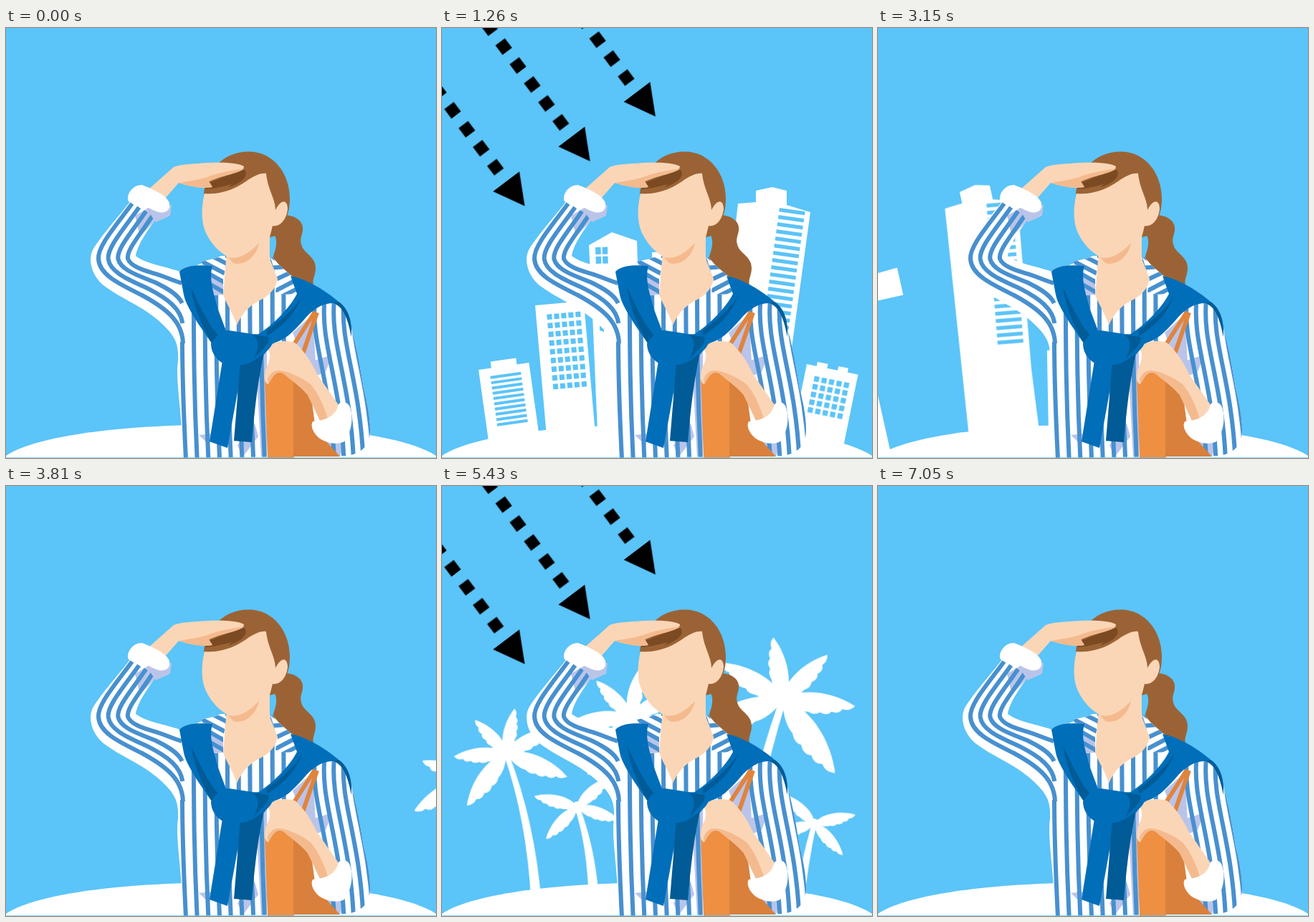
Recreate the animation shown at these times as an HTML page. Size 600x600 px, loop 7200 ms.

```html
<!DOCTYPE html>
<html lang="en">
<head>
<meta charset="utf-8">
<title>Looking into the distance</title>
<style>
html, body { margin: 0; width: 100%; height: 100%; overflow: hidden; background: #5bc4f8; }
svg { display: block; width: 100vw; height: 100vh; }
.turn { transform-origin: 285px 1700px; }
.white { fill: #fff; }
.sky { fill: #5bc4f8; }
.skin { fill: #fbd6b6; }
.skin2 { fill: #f4ba8e; }
.hair { fill: #9b6335; }
.hair2 { fill: #7b4a22; }
.knit { fill: #006eb9; }
.knit2 { fill: #005b96; }
.shade { fill: #bac4e9; }
.stripes { fill: none; stroke: #4790cf; stroke-width: 6; }
</style>
</head>
<body>
<svg viewBox="0 0 600 600">
  <defs>
    <clipPath id="shirt"><path d="M174 241C160 260 128 295 120 312C114 328 122 350 140 362C165 380 200 392 225 420C238 434 241 445 240 465C236 490 246 540 247 600L470 597C490 597 502 587 506 575C511 560 506 530 499 503C494 470 486 425 473 392L440 375L398 350L372 320L300 318L243 340C220 332 195 329 181 318C184 300 200 280 209 266L216 250L180 234Z"/></clipPath>
    <clipPath id="collarL"><path d="M272 326L303 319L309 322L303 350V372L288 373L285 345Z"/></clipPath>
    <clipPath id="collarR"><path d="M369 320L400 347L406 371L383 372L376 368L379 352Z"/></clipPath>
  </defs>
  <rect class="sky" width="600" height="600"/>
  <path class="white" d="M-4 600C70 538 530 538 604 600Z"/>
  <g id="city" class="turn white"></g>
  <g id="palms" class="turn white"></g>
  <g id="arrows"></g>

  <g id="woman">
    <path class="hair" d="M384 262C396 259 413 266 414 278C415 288 409 292 412 302C415 315 432 318 432 335C432 346 427 349 429 359L400 350C392 336 373 329 372 324C373 314 381 303 375 289Z"/>
    <g clip-path="url(#shirt)">
      <rect class="white" x="100" y="220" width="420" height="380"/>
      <path class="shade" d="M180 262L187 291L207 270L232 262L232 246L200 250ZM348 450H364V600H356ZM269 568L287 566L284 582ZM347 552L323 582L330 599L352 570ZM427 465L455 456L446 480L434 485ZM400 425L428 400L434 500L420 480ZM282 345L300 345L296 374L288 374ZM440 574L472 576L466 600Z"/>
      <g id="shirtStripes" class="stripes"></g>
    </g>
    <g clip-path="url(#collarL)">
      <path class="white" d="M265 315H315V380H265Z"/>
      <path class="shade" d="M284 345L304 350V380H284Z"/>
      <path class="stripes" d="M272 325L310 345M287 318L312 331M280 341L308 357M282 356L308 371"/>
    </g>
    <g clip-path="url(#collarR)">
      <path class="white" d="M350 315H410V385H350Z"/>
      <path class="stripes" d="M366 335L392 333M374 352L402 339M366 372L406 351M376 379L410 362"/>
    </g>

    <path class="skin" d="M309 300L303 372C310 390 318 400 322 415C331 395 342 386 358 378C368 372 377 363 379 350L368 322V280Z"/>
    <path class="hair" d="M276 231C279 205 298 172.500 339 172.500C373 172.500 396 203 396 238C396 262 388 270 383 277L376 290L368 292L360 230Z"/>
    <path class="skin" d="M277 231C273 247 272 266 277 281C284 300 303 321 319 321C332 321 345 309 354 300L368 292L372 276C382 278 391 268 393 253C393 239 384 238 376 254C376 238 365 225 363 203C355 202 345 207 335 214C315 228 296 232 277 231Z"/>
    <path class="skin2" d="M310 320C327 324 341 312 353 300C350 318 333 333 317 328Z"/>
    <path class="hair2" d="M283 216L332 197C341 207 327 217 309 223C297 226 288 229 277 227Z"/>
    <path class="hair" d="M276 231L278 225C290 224 304 221 315 218L306 227C296 231 286 232 276 231Z"/>

    <path class="skin" d="M199 225L234 194C244 190 255 190 268 189C294 187 322 187 332 193C333 198 318 203 301 207L283 214L288 222C270 224 253 220 241 216L221 239Z"/>
    <path class="skin2" d="M242 216C262 212 275 211 286 206C303 200 322 198 333 196C325 203 300 206 283 214L288 222C273 225 256 221 242 216Z"/>
    <path class="shade" d="M196 252L209 271L229 262L231 247Z"/>
    <path class="white" d="M170 238C170 230 177 219 190 219C205 225 224 233 228 244C230 254 223 259 213 257C200 253 188 243 178 243C172 244 170 242 170 238Z"/>

    <path fill="#ee8f42" d="M361 488L365 600H402V470H375Z"/>
    <path fill="#d9803c" d="M401 470L424 500L432 560L466 598H401Z"/>
    <path d="M397 449L431 396M414 455L434 397" fill="none" stroke="#e0843d" stroke-width="6"/>

    <path class="knit" d="M242 340C250 331 268 330 288 332C282 352 292 376 296 393L308 425L288 441C273 420 251 389 248 372ZM348 430C368 418 394 394 406 371L397 346C420 350 448 368 464 382C476 390 483 405 482 428C479 408 469 386 457 384C442 384 429 391 415 408C401 424 388 437 371 440L360 456Z"/>
    <path class="knit2" d="M258 362C270 387 281 413 297 430L288 441C276 421 263 393 258 362ZM464 382C476 390 483 407 482 431C477 406 471 389 457 384ZM364 422C390 402 399 395 414 373L408 385C398 404 387 414 364 430Z"/>
    <path class="knit" d="M303 458L284 577L309 586L330 470Z"/>
    <path class="knit2" d="M327 466L318 576L343 578C346 544 350 497 361 449Z"/>

    <path class="skin" d="M370 443C376 436 393 436 403 439C416 450 426 466 434 483L469 533L442 556L421 512C411 500 400 493 387 482C376 477 372 487 366 497C359 495 360 482 364 472C369 464 369 455 366 449Z"/>
    <path class="skin2" d="M383 478C400 481 414 489 425 497C437 511 444 529 449 545L441 554L421 512C410 499 400 493 387 482C376 477 372 487 366 497L365 490C369 480 376 477 383 478Z"/>
    <path class="knit" d="M286 440C293 430 300 421 311 422L344 427C358 428 370 426 372 435C373 447 358 456 346 464C333 473 318 470 301 467C291 460 286 451 286 440Z"/>
    <path class="knit2" d="M345 428L366 431C369 442 354 451 344 463C353 449 355 438 345 428Z"/>
    <path class="white" d="M428 549C440 548 458 545 463 528C466 519 475 521 479 527C486 543 482 564 472 577C461 583 446 578 438 573C429 566 424 555 428 549Z"/>
  </g>
  <rect class="sky" y="599" width="600" height="1" opacity=".7"/>
</svg>

<script>
const LOOP = 7200, HALF = LOOP / 2;
const $ = id => document.getElementById(id);
const times = (n, make) => Array.from({ length: n }, (_, i) => make(i)).join('');

// Shirt: arm stripes blend between an outer and an inner curve
const outer = [176, 245, 150, 280, 128, 305, 129, 322, 130, 345, 160, 358, 190, 373, 225, 392, 246, 410, 247, 440];
const inner = [205, 261, 186, 290, 168, 310, 170, 322, 175, 335, 200, 340, 215, 345, 228, 350, 238, 354, 245, 356];

function armStripe(i) {
  const [x, y, ...rest] = outer.map((v, k) => v + (inner[k] - v) * i / 3);
  return `<path d="M${x} ${y}C${rest.join(' ')}"/>`;
}

const bodyStripe = i => {
  const x = 247 + 15.7 * i;
  return `<path d="M${x - 1} ${i ? 310 : 438}C${x - 1} 460 ${x} 520 ${x + 4} 602"/>`;
};
const sleeveStripe = i => {
  const x = 431 + 13.5 * i;
  return `<path d="M${x} 380C${x - 6} 440 ${x + 22} 490 ${x + 27} 602"/>`;
};
$('shirtStripes').innerHTML = times(4, armStripe) + times(10, bodyStripe) + times(5, sleeveStripe);

// City: each block is drawn in its own tilted frame
const rect = (x, y, w, h, cls = 'white') =>
  `<rect class="${cls}" x="${x}" y="${y}" width="${w}" height="${h}"/>`;
const windows = (x, y, cols, rows, dx, dy, w, h) =>
  times(rows, r => times(cols, c => rect(x + c * dx, y + r * dy, w, h, 'sky')));
const block = (x, y, tilt, body) =>
  `<g transform="translate(${x} ${y}) rotate(${tilt})">${body}</g>`;

$('city').innerHTML =
  block(51, 477, -8, rect(0, 0, 71, 150) + rect(18, -9, 36, 12) + windows(15, 11, 1, 10, 0, 7.4, 43, 4)) +
  block(130, 387, -5, rect(0, 0, 68, 240) + windows(15, 14, 5, 9, 10, 12.2, 7, 7.5)) +
  '<path d="M210 400H265V610H219Z"/><path class="sky" d="M220 415L226 420V424L220 422Z"/>' +
  '<path d="M205 303L237 285L272 297L274 360L207 345Z"/>' +
  block(214, 306, -2, windows(0, 0, 2, 2, 9.5, 13, 7.5, 10)) +
  '<path d="M293 313L330 311V350H293Z"/>' +
  '<path d="M413 245L438 243V227L461 222L481 227V247L514 257L482 490L470 620H370Z"/>' +
  block(471, 251, 8, windows(0, 0, 1, 20, 0, 10.1, 36, 5.2)) +
  block(509, 469, 11.5, rect(0, 0, 73, 150) + rect(14, -6, 15, 10) + rect(44, -6, 14, 10) +
    windows(14, 14, 5, 5, 10.6, 11, 7.2, 7.5));

// Palms: fronds fan out by a constant angle and grow longer towards the sides
const LEAF = 'M0 0C15 -18 62 -20 100 2Q92 10 83 7Q78 15 68 11Q62 18 52 13Q45 18 36 13Q20 14 0 0Z';

const frond = (angle, length) => {
  const k = length / 100, flip = angle < -90 ? -k : k;
  return `<path d="${LEAF}" transform="rotate(${angle}) scale(${k} ${flip})"/>`;
};
const fullCrown = times(6, i => frond(18 - 50 * i, 64 + 4.2 * (i - 2.5) ** 2));
const thinCrown = times(4, i => frond(15 - 60 * (i < 2 ? i : i + 1), 62));

// A negative size mirrors the crown
function palm(x, y, size, crown, footX, footY) {
  const w = 3.6 * Math.abs(size);
  return `<g transform="translate(${x} ${y})"><g transform="scale(${size} ${Math.abs(size)})">${crown}</g>
    <path d="M${-w} 0Q${footX * .75 - w} ${footY * .45} ${footX - 2 * w} ${footY}H${footX + 2 * w}Q${footX * .75 + 2 * w} ${footY * .45} ${w} 0Z"/>
    <circle r="${2.2 * w}"/></g>`;
}

$('palms').innerHTML = '<g transform="rotate(.95 285 1700)">' +
  palm(68, 378, 1, fullCrown, 45, 205) +
  palm(168, 450, 1, thinCrown, 25, 125) +
  palm(241, 325, 1.1, fullCrown, 20, 280) +
  palm(452, 297, -1.38, fullCrown, -62, 310) +
  palm(499, 468, -.95, thinCrown, -20, 120) + '</g>';

// Arrows: a head at the tip, dashes behind it
const dash = i => rect(-76.3 - 33.1 * i, -8.3, 16.6, 16.6, '');
$('arrows').innerHTML = times(3, i =>
  block(115.5 + 91.2 * i, 248.5 - 62.5 * i, 53, '<path d="M0 0L-43 -23V23Z"/>' + times(7, dash)));

// Motion
const play = (el, frames, delay = 0) => el.animate(
  frames.map(([ms, props, easing = 'linear']) => ({ ...props, offset: ms / LOOP, easing })),
  { duration: LOOP, iterations: Infinity, delay });

const turn = deg => ({ transform: `rotate(${deg}deg)` });
const swing = [
  [0, turn(30), 'cubic-bezier(.26,0,.4,1.36)'],
  [1200, turn(0)],
  [2550, turn(0), 'cubic-bezier(.6,-.32,.74,1)'],
  [3480, turn(-30)],
  [LOOP, turn(-30)]
];
play($('city'), swing);
play($('palms'), swing, -HALF);

// Arrows build up from the far end and vanish at once
const show = { opacity: 1 }, hide = { opacity: 0 }, cut = 'step-end';
for (const arrow of $('arrows').children) {
  [...arrow.children].forEach((part, i) => {
    const start = 895 - 30 * i;
    play(part, [
      [0, hide, cut], [start, show, cut], [2835, hide, cut],
      [HALF + start, show, cut], [HALF + 2805, hide, cut], [LOOP, hide]
    ]);
  });
}
</script>
</body>
</html>
```
